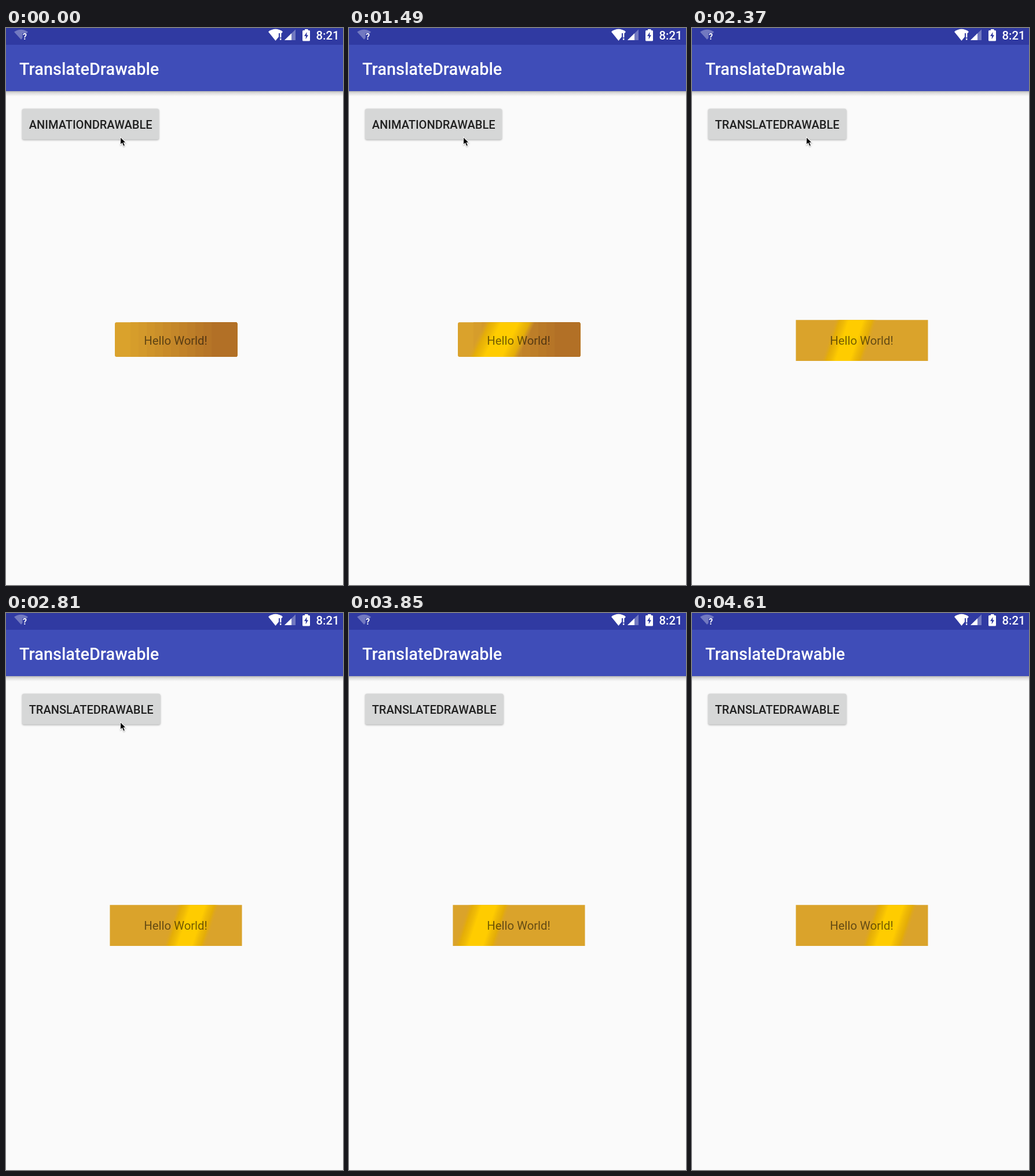
An HTML page with a canvas for the animation above (4710 ms loop, 582 by 962 pixels).

```html
<!DOCTYPE html>
<html lang="en">
<head>
<meta charset="utf-8">
<title>TranslateDrawable</title>
<style>
  html, body { margin: 0; width: 100%; height: 100%; overflow: hidden; background: #fafafa; }
  canvas { display: block; }
</style>
</head>
<body>
<canvas id="stage" width="582" height="962"></canvas>
<script>
const ctx = document.getElementById('stage').getContext('2d');
const FONT = 'Roboto, sans-serif';
const BAR = '#303aa2';
const LOOP = 4710;
const START = 893;       // the first shine appears
const STEP = 147;        // time between picture changes
const SWITCH_STEP = 8;   // the second panel takes over
const RESTART_STEP = 20; // its shine begins a new pass
const MOVE_STEP = 14;    // the pointer leaves the button

const mix = (a, b, k) => `rgb(${a.map((v, i) => v + (b[i] - v) * k)})`;
const glide = (from, speed, gain, n) => from + n * (speed + gain * n);

function rect(x, y, w, h, fill, radius = 0) {
  ctx.fillStyle = fill;
  ctx.beginPath();
  ctx.roundRect(x, y, w, h, radius);
  ctx.fill();
}

function polygon(points, fill) {
  ctx.fillStyle = fill;
  ctx.beginPath();
  points.forEach(([x, y]) => ctx.lineTo(x, y));
  ctx.closePath();
  ctx.fill();
}

function text(str, x, y, size, weight, fill, align = 'left') {
  ctx.font = `${weight} ${size}px ${FONT}`;
  ctx.textAlign = align;
  ctx.fillStyle = fill;
  ctx.fillText(str, x, y);
}

function fan(x, y, w, h, fill) {
  ctx.fillStyle = fill;
  ctx.beginPath();
  ctx.moveTo(x, y + h * 0.22);
  ctx.quadraticCurveTo(x + w / 2, y - h * 0.24, x + w, y + h * 0.22);
  ctx.lineTo(x + w / 2, y + h);
  ctx.fill();
}

function statusBar() {
  const faint = 'rgba(255,255,255,.32)';
  rect(0, 0, 582, 30, BAR);
  fan(14, 3, 24, 17, faint);
  rect(28.5, 9, 10, 12, BAR);
  text('?', 29, 20, 14, 700, '#fff');

  fan(453, 2, 25, 20, '#fff');
  rect(471, 9, 8, 13, BAR);
  rect(473, 8.5, 2.4, 8, '#fff');
  rect(473, 18, 2.4, 2.6, '#fff');

  polygon([[481, 21], [500, 21], [500, 2.5]], faint);
  polygon([[481, 21], [493, 21], [493, 9.3]], '#fff');

  rect(516, 2, 5.5, 4, '#fff');
  rect(512, 4, 13, 18.5, '#fff', 1.5);
  polygon([[519.5, 7], [515, 14], [518, 14], [517.5, 19.5], [522, 12.3], [519.3, 12.3]], BAR);
  text('8:21', 535.5, 20, 20.3, 500, '#fff');
}

function appBar() {
  const shadow = ctx.createLinearGradient(0, 109, 0, 118);
  shadow.addColorStop(0, 'rgba(0,0,0,.28)');
  shadow.addColorStop(0.35, 'rgba(0,0,0,.12)');
  shadow.addColorStop(1, 'rgba(0,0,0,0)');
  rect(0, 109, 582, 9, shadow);
  rect(0, 29, 582, 80, '#3f4db8');
  text('TranslateDrawable', 23, 80.7, 28.85, 500, '#fff');
}

function button(step) {
  const translated = step >= SWITCH_STEP;
  const raised = step === SWITCH_STEP;
  ctx.save();
  ctx.shadowColor = 'rgba(0,0,0,.32)';
  ctx.shadowBlur = raised ? 8 : 3;
  ctx.shadowOffsetY = raised ? 2 : 1;
  rect(28, 139.5, translated ? 238.5 : 236, 53, raised ? '#d3d5d4' : '#d6d7d7', 3);
  ctx.restore();
  text(translated ? 'TRANSLATEDRAWABLE' : 'ANIMATIONDRAWABLE', 39.7, 174, 20.05, 500, '#202020');
}

function shine(left, top, height, width, slope) {
  const edge = ['rgba(221,165,36,0)', '#e4ad08', '#efba06', '#ffcc00', '#ffcc00'];
  const colors = [...edge, ...edge.slice().reverse()];
  const fill = ctx.createLinearGradient(0, 0, width, 0);
  colors.forEach((color, i) => fill.addColorStop(i / (colors.length - 1), color));
  ctx.save();
  ctx.transform(1, 0, -slope, 1, left + slope * height, top);
  rect(0, 0, width, height, fill);
  ctx.restore();
}

function panel(x, y, w, h, radius, paint) {
  ctx.save();
  ctx.beginPath();
  ctx.roundRect(x, y, w, h, radius);
  ctx.clip();
  paint();
  ctx.restore();
}

function bronzePanel(step) {
  panel(188, 508.3, 211.4, 59.7, 3, () => {
    const bands = 11;
    for (let i = 0; i <= bands; i++) {
      const x = i ? 201 + 14 * i : 188;
      rect(x, 508, 400 - x, 60, mix([218, 162, 44], [178, 112, 38], i / bands));
    }
    if (step >= 0) shine(97 + 27 * step, 508, 60, 88, 0.48);
  });
}

function goldPanel(step) {
  const left = step < RESTART_STEP
    ? glide(197, 12.1, 0.58, step - SWITCH_STEP)
    : glide(182, 17.7, 0.9, step - RESTART_STEP);
  panel(179.4, 504.3, 228.1, 70.7, 0, () => {
    rect(179, 504, 229, 71, '#daa32b');
    shine(left, 504, 71, 73, 0.33);
  });
}

function pointer(step) {
  const n = Math.max(0, step - MOVE_STEP);
  const x = 197.5 + 370 * (1 - 0.4 ** n);
  const y = 188 + 792 * Math.sin(Math.PI / 2 * Math.min(1, n / 5.3));
  ctx.save();
  ctx.translate(x, y);
  ctx.shadowColor = 'rgba(0,0,0,.3)';
  ctx.shadowBlur = 2;
  ctx.shadowOffsetY = 1;
  polygon([[-0.5, -1], [-0.5, 15], [3, 11.8], [5.2, 16.8], [8.6, 15.4], [6.5, 10.6], [11, 10.6]], '#fff');
  ctx.shadowColor = 'transparent';
  polygon([[0.5, 1.4], [0.5, 12.6], [3.3, 10], [5.7, 15.4], [7.3, 14.7], [5, 9.4], [8.6, 9.4]], '#000');
  ctx.restore();
}

function draw() {
  const step = Math.floor((performance.now() % LOOP - START) / STEP);
  rect(0, 0, 582, 962, '#fafafa');
  statusBar();
  appBar();
  button(step);
  (step < SWITCH_STEP ? bronzePanel : goldPanel)(step);
  text('Hello World!', 293, 547, 20.3, 400, 'rgba(0,0,0,.54)', 'center');
  pointer(step);
  requestAnimationFrame(draw);
}
draw();
</script>
</body>
</html>
```
